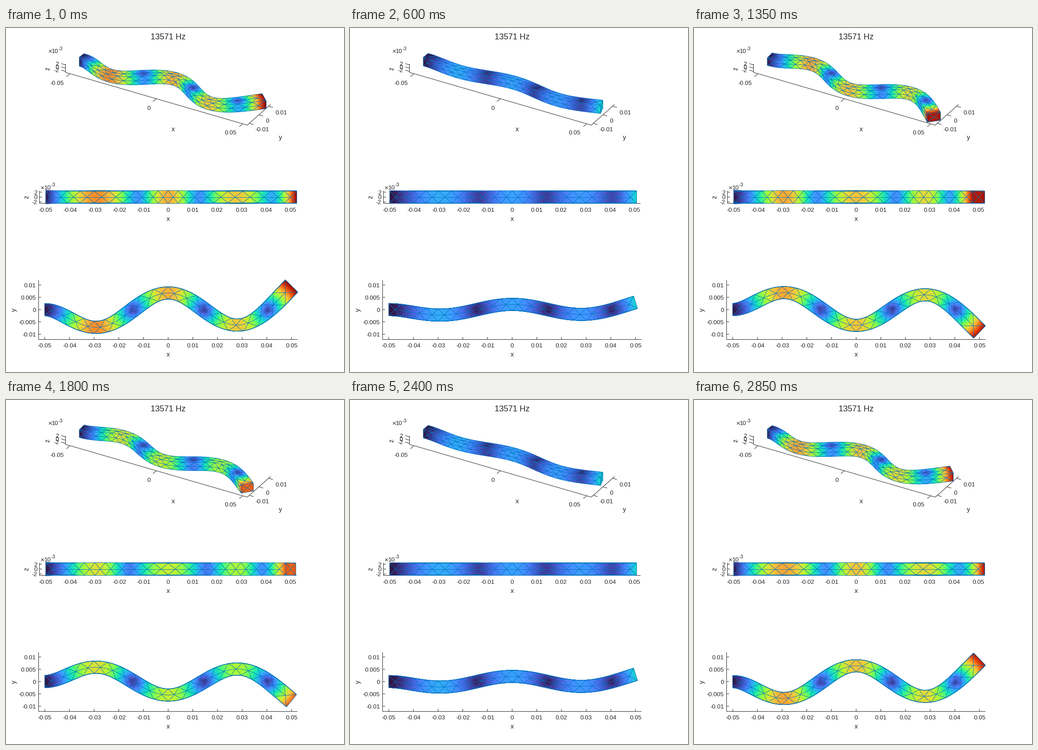
Write a matplotlib script that moves like this. It is 741 px wide and 756 px high and loops after 3 s.

```python
import numpy as np
import matplotlib.pyplot as plt
from matplotlib.animation import FuncAnimation
from matplotlib.collections import LineCollection
from matplotlib.tri import Triangulation

WIDTH, HEIGHT, DPI = 741, 756, 100
PT = 72 / DPI                      # points per pixel
FRAMES, INTERVAL = 20, 150

HALF_LEN, HALF = 0.05, 0.0025      # beam half length and half thickness
CELLS = 20
MODE = 3.5 * np.pi                 # fourth cantilever eigenvalue
BETA = MODE / (2 * HALF_LEN)
AMP = 0.0048
SHEAR, POISSON = 0.95, 0.3
PEAK = 0.0099

INK = "#262626"
EDGE = (0, 0.447, 0.741)

plt.rcParams["font.family"] = "Liberation Sans"


def split(n):
    """Barycentric weights and index triples that cut a triangle into n*n."""
    grid = [(i, j) for i in range(n + 1) for j in range(n + 1 - i)]
    at = {p: k for k, p in enumerate(grid)}
    weights = np.array([(n - i - j, i, j) for i, j in grid]) / n
    tris = []
    for i, j in grid:
        if i + j < n:
            tris.append((at[i, j], at[i + 1, j], at[i, j + 1]))
        if i + j < n - 1:
            tris.append((at[i + 1, j], at[i + 1, j + 1], at[i, j + 1]))
    return weights, np.array(tris)


def side_triangles(point):
    """Diagonal net on one long side; point(x, s) places s in -1..1 across it."""
    xe = np.linspace(-HALF_LEN, HALF_LEN, CELLS + 1)
    xc = (xe[1:] + xe[:-1]) / 2
    mid = [point(x, 0) for x in xc]
    tris = []
    for s in (-1, 1):
        rim = [point(x, s) for x in xe]
        tris += [(rim[k], rim[k + 1], mid[k]) for k in range(CELLS)]
        tris += [(mid[k], mid[k + 1], rim[k + 1]) for k in range(CELLS - 1)]
    for x, c in ((xe[0], mid[0]), (xe[-1], mid[-1])):
        tris.append((point(x, -1), point(x, 1), c))
    return tris


def end_triangles(x):
    ring = [(x, a * HALF, b * HALF) for a, b in ((-1, -1), (1, -1), (1, 1), (-1, 1))]
    return [(ring[k], ring[(k + 1) % 4], (x, 0, 0)) for k in range(4)]


def build_mesh():
    tris = end_triangles(-HALF_LEN) + end_triangles(HALF_LEN)
    for f in (-HALF, HALF):
        tris += side_triangles(lambda x, s: (x, s * HALF, f))
        tris += side_triangles(lambda x, s: (x, f, s * HALF))
    tris = np.array(tris, float)
    normal = np.cross(tris[:, 1] - tris[:, 0], tris[:, 2] - tris[:, 0])
    inward = np.sum(normal * tris.mean(axis=1), axis=1) < 0
    tris[inward] = tris[inward][:, ::-1]
    return tris


def shape(p):
    """Displacement field of the bending mode at full amplitude."""
    x, y, z = p[..., 0], p[..., 1], p[..., 2]
    s = BETA * (x + HALF_LEN)
    near, far = np.exp(-s), np.exp(s - MODE)
    w = -AMP * (near - np.cos(s) + np.sin(s) - far)
    slope = -AMP * BETA * (-near + np.sin(s) + np.cos(s) - far)
    curve = -AMP * BETA**2 * (near + np.cos(s) - np.sin(s) - far)
    return np.stack([-SHEAR * slope * y, w, POISSON * curve * y * z], axis=-1)


BASE = build_mesh()
W2, T2 = split(2)
W3, T3 = split(3)
FINE = (W2 @ BASE)[:, T2].reshape(-1, 3, 3)

# Unique edges, each as a start, middle and end point.
starts, ends = BASE.reshape(-1, 3), np.roll(BASE, -1, axis=1).reshape(-1, 3)
middles = (starts + ends) / 2
_, first, owner = np.unique(np.round(middles, 7), axis=0,
                            return_index=True, return_inverse=True)
EDGES = np.stack([starts, middles, ends], axis=1)[first]
EDGE_OF = owner.reshape(-1, 3)

FINE_U, EDGES_U = shape(FINE), shape(EDGES)

# Each view: pixel origin and the 2x3 projection matrix.
VIEWS = [
    (np.array([355.6, 124]), np.array([[3790, 2125, 0], [1095, -1875, -3600]])),
    (np.array([355.5, 371.5]), np.array([[5368, 0, 0], [0, 0, -5400]])),
    (np.array([355.5, 618.8]), np.array([[5410, 0, 0], [0, -5400, 0]])),
]

fig = plt.figure(figsize=(WIDTH / DPI, HEIGHT / DPI), dpi=DPI, facecolor="white")
ax = fig.add_axes([0, 0, 1, 1])
ax.set_xlim(0, WIDTH)
ax.set_ylim(HEIGHT, 0)
ax.axis("off")
ax.autoscale(False)


def line(*pts):
    xs, ys = zip(*pts)
    ax.plot(xs, ys, color=INK, lw=PT, zorder=1, solid_capstyle="butt",
            snap=False)


def label(x, y, text, size=13.4, ha="center", **kw):
    ax.text(x, y + 0.36 * size, text, fontsize=size * PT, ha=ha,
            va="baseline", color=INK, **kw)


def turned(x, y, text):
    ax.text(x, y, text, fontsize=14.5 * PT, ha="center", va="center",
            rotation=90, color=INK)


def exponent(x, y):
    label(x + 1, y + 0.5, "×", 14, ha="left")
    label(x + 9, y, "10", 13.4, ha="left")
    label(x + 24, y - 5.5, "-3", 11, ha="left")


def draw_perspective_axes():
    line((130.5, 79), (130.5, 97.5), (529, 213.5), (580, 168))
    for v, text, lx, ly in ((-0.05, "-0.05", 112, 120), (0, "0", 313, 175),
                            (0.05, "0.05", 493, 229)):
        x, y = 329.5 + 3790 * v, 155.5 + 1095 * v
        line((x, y), (x - 7.5, y + 6.5))
        label(lx, ly, text)
    for v, text, lx, ly in ((-0.01, "-0.01", 562, 222), (0, "0", 573, 203.5),
                            (0.01, "0.01", 603.5, 185)):
        x, y = 554.5 + 2125 * v, 190.7 - 1875 * v
        line((x, y), (x + 9.5, y + 2.8))
        label(lx, ly, text)
    for v in (2, 0, -2):
        y = 88.2 - 3.6 * v
        line((130.5, y), (121, y - 2.8))
        label(116, y - 3.2, str(v), ha="right")
    exponent(91, 50.5)
    turned(91, 89.5, "z")
    label(366, 222, "x", 14.5)
    label(602, 240, "y", 14.5)


def draw_flat_axes(left, right, top, base, scale, text_y):
    line((left, top), (left, base), (right, base))
    for k in range(-5, 6):
        x = 355.5 + scale * k / 100
        line((x, base), (x, base - 5.5))
        label(x, text_y, f"{k / 100:.2f}" if k else "0")
    label(355.5, text_y + 19.5, "x", 14.5)


def draw_axes():
    label(355.5, 18.5, "13571 Hz", 18)
    draw_perspective_axes()

    draw_flat_axes(73.5, 637, 358, 385.5, 5368, 399.5)
    for v in (2, 0, -2):
        y = 371.5 - 5.4 * v
        line((73.5, y), (79, y))
        label(68.5, y, str(v), ha="right")
    exponent(74.5, 350)
    turned(45, 371.5, "z")

    draw_flat_axes(71.5, 639, 554, 684.5, 5410, 697.5)
    for v, text in ((-0.01, "-0.01"), (-0.005, "-0.005"), (0, "0"),
                    (0.005, "0.005"), (0.01, "0.01")):
        y = 618.8 - 5400 * v
        line((71.5, y), (77, y))
        label(65.5, y, text, ha="right")
    turned(18, 619, "y")


def draw_beam(view, faces, size, edges):
    origin, matrix = view
    flat = faces @ matrix.T + origin
    a, b = flat[:, 1] - flat[:, 0], flat[:, 2] - flat[:, 0]
    seen = a[:, 0] * b[:, 1] - a[:, 1] * b[:, 0] < -0.02

    pts = W3 @ flat[seen]
    values = (W3 @ size[seen][..., None]).ravel()
    offset = np.arange(len(pts))[:, None, None] * len(W3)
    tris = (T3[None] + offset).reshape(-1, 3)
    xy = pts.reshape(-1, 2)
    skin = ax.tripcolor(Triangulation(xy[:, 0], xy[:, 1], tris), values,
                        shading="gouraud", cmap="turbo", vmin=0, vmax=PEAK,
                        zorder=2)

    shown = np.unique(EDGE_OF[seen.reshape(len(BASE), -1).any(axis=1)])
    net = LineCollection(edges[shown] @ matrix.T + origin, colors=[EDGE],
                         linewidths=0.9 * PT, zorder=3)
    ax.add_collection(net, autolim=False)
    return [skin, net]


live = []


def update(i):
    while live:
        live.pop().remove()
    swing = np.cos(2 * np.pi * i / FRAMES)
    faces = FINE + swing * FINE_U
    size = np.linalg.norm(swing * FINE_U, axis=-1)
    edges = EDGES + swing * EDGES_U
    for view in VIEWS:
        live.extend(draw_beam(view, faces, size, edges))
    return live


draw_axes()
anim = FuncAnimation(fig, update, frames=FRAMES, interval=INTERVAL,
                     repeat=True, repeat_delay=0, blit=False)
plt.show()
```
